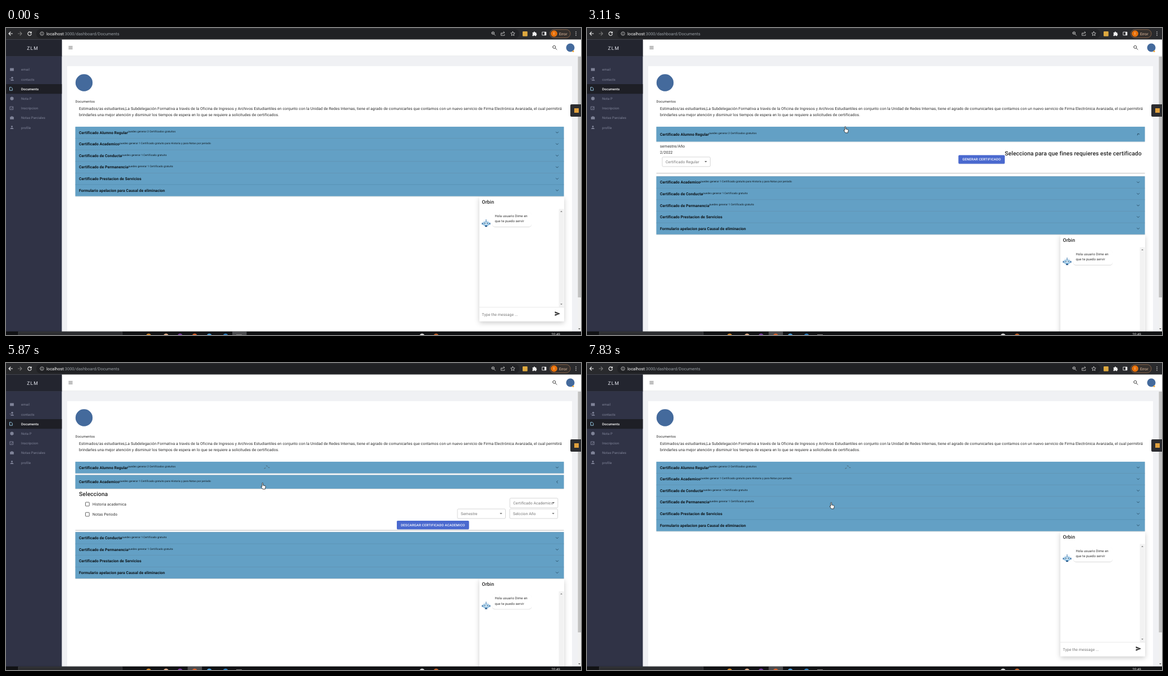
These frames come from a looping animation (1024 by 547 pixels, 8000 ms). An HTML page:

```html
<!DOCTYPE html>
<html lang="es">
<head>
<meta charset="utf-8">
<title>Documentos</title>
<style>
  html, body { margin: 0; width: 100%; height: 100%; overflow: hidden; background: #fff; }
  svg { display: block; }
  text { font-family: Roboto, sans-serif; letter-spacing: .0094em; white-space: pre; text-rendering: geometricPrecision; }
  .line { fill: none; stroke-linecap: round; stroke-linejoin: round; }
</style>
</head>
<body>
<svg id="stage" width="1024" height="547" viewBox="0 0 1024 547"></svg>
<script>
const ROW = 20.62, GROW = 6.86, TOP = 175.9, LEFT = 123.5, WIDTH = 870;

// Markup helpers; text is placed by its vertical centre.
const text = (x, y, size, str, fill = '#2a2a2a', weight = 400, more = '') =>
  `<text x="${x}" y="${y + size * .35}" font-size="${size}" fill="${fill}" font-weight="${weight}" ${more}>${str}</text>`;
const rect = (x, y, w, h, fill, more = '') =>
  `<rect x="${x}" y="${y}" width="${w}" height="${h}" fill="${fill}" ${more}/>`;
const dot = (x, y, r, fill, more = '') => `<circle cx="${x}" cy="${y}" r="${r}" fill="${fill}" ${more}/>`;
const line = (x, y, d, stroke, width = 1) =>
  `<path class="line" transform="translate(${x} ${y})" d="${d}" stroke="${stroke}" stroke-width="${width}"/>`;
const shape = (x, y, d, fill) => `<path transform="translate(${x} ${y})" d="${d}" fill="${fill}"/>`;
const select = (x, y, label) =>
  rect(x, y, 85.5, 17, '#fff', 'rx="1.7" stroke="#bdbdbd" stroke-width=".6"') +
  text(x + 6, y + 8.7, 6.86, label, '#757575') + shape(x + 77.5, y + 8, 'M-2.2-.8h4.4L0 1.5z', '#666');
const button = (x, y, w, label) =>
  rect(x, y + .6, w, 15.6, '#9aa5c8', 'rx="1.7" opacity=".6"') + rect(x, y, w, 15.4, '#4a69cf', 'rx="1.7"') +
  text(x + w / 2, y + 7.8, 6, label, '#fff', 500, 'text-anchor="middle" style="letter-spacing:.0286em"');
const heading = (x, y, str) => text(x, y, 10.29, str, '#222', 500);
const checkbox = (y, label) =>
  rect(141.5, y - 3.4, 6.8, 6.8, 'none', 'rx=".8" stroke="#555" stroke-width=".9"') + text(154, y, 6.86, label, '#333');

const free = (n, rest) => `puedes generar ${n} Certificado${rest}`;
const rows = [
  { title: 'Certificado Alumno Regular', note: free(2, 's gratuitos'), full: 58, body:
    text(130, 8.5, 6.86, 'semestre/Año') + text(130, 19, 6.86, '2/2022') + select(134, 27.5, 'Certificado Regular') +
    button(661.5, 24, 82.5, 'GENERAR CERTIFICADO') +
    heading(744, 21.4, 'Selecciona para que fines requieres este certificado') },
  { title: 'Certificado Academico', note: free(1, ' gratuito para Historia y para Notas por periodo'), full: 82.3, body:
    heading(130, 10, 'Selecciona') + checkbox(27.6, 'Historia academica') + checkbox(45.8, 'Notas Periodo') +
    select(897.3, 17, 'Certificado Academico') + select(804, 36.2, 'Semestre') + select(897, 36.2, 'Selccion Año') +
    button(696, 57, 128.5, 'DESCARGAR CERTIFICADO ACADEMICO') },
  { title: 'Certificado de Conducta', note: free(1, ' gratuito'), full: 80, body:
    text(130, 8.6, 6.86, 'Sanciones:') +
    text(171, 8.6, 6.86, 'Durante su permanencia el(la) estudiante no tuvo sanciones disciplinarias por contravención al Reglamento de Investigaciones Sumarias y Sumarios que instruyen a los Estudiantes de la Universidad Católica de Temuco.') },
  { title: 'Certificado de Permanencia', note: free(1, ' gratuito') },
  { title: 'Certificado Prestacion de Servicios' },
  { title: 'Formulario apelacion para Causal de eliminacion' }
];

const browserBar = () =>
  rect(0, 0, 1024, 20.5, '#292a2d') + rect(54, 2, 860, 16.5, '#202124', 'rx="8"') +
  line(8, 10, 'M3.5 0H-3M0-3L-3 0 0 3', '#eee', 1.1) + line(25, 10, 'M-3.5 0H3M0-3L3 0 0 3', '#777', 1.1) +
  line(42, 10, 'M2.6-1.9A3.2 3.2 0 1 0 3.2 .8M3.2-3.3v2.3H.9', '#eee', 1.1) +
  line(64, 10, 'M-3.2 0a3.2 3.2 0 1 0 6.4 0a3.2 3.2 0 1 0-6.4 0M0-.3v1.8M0-1.7v.1', '#ccc', .8) +
  text(72, 10.2, 7.4, '<tspan fill="#fff">localhost</tspan>:3000/dashboard/Documents', '#9aa0a6') +
  line(868, 10, 'M-3-1a2.3 2.3 0 1 0 4.6 0a2.3 2.3 0 1 0-4.6 0M1 .8L3.5 3.3M-1.7-1h2', '#ccc', .9) +
  line(885, 10, 'M-1.5-1h-2v4.3h6.3V1.5M-1.5 1c0-2 1-3 3.5-3M1-3.5L3-2 1-.3', '#ccc', .8) +
  line(902.5, 10, 'M0-3.6l1.1 2.4 2.6.3-1.9 1.8.5 2.6L0 2.2l-2.3 1.3.5-2.6-1.9-1.8 2.6-.3z', '#ddd', .8) +
  rect(920, 6, 8.7, 8.7, '#dda83f', 'rx="1"') +
  shape(941, 10, 'M-3.5-2h2a1.4 1.4 0 0 1 2.8 0h2v2a1.4 1.4 0 0 1 0 2.7v1.5h-2.2a1.3 1.3 0 0 0-2.5 0h-2.1V1.7a1.2 1.2 0 0 0 0-2.2z', '#eee') +
  line(958.5, 10, 'M-3.3-2.8h6.6v5.6h-6.6z', '#eee', .9) + rect(959, 7, 3, 6, '#eee') +
  rect(968.5, 2.8, 36.5, 14.6, '#35302d', 'rx="7.3" stroke="#a7754f" stroke-width=".7"') + dot(976, 10, 5.8, '#e8710a') +
  text(976, 10.1, 6.5, 'I', '#fff', 400, 'text-anchor="middle"') + text(985, 10.2, 6.6, 'Error', '#f0c8a8') +
  [-3, 0, 3].map(d => dot(1015, 10 + d, .8, '#eee')).join('');

const menuItems = [
  ['email', 'M-3.4-2.5h6.8v5h-6.8z'],
  ['contacts', 'M-1.3-2.5a1.6 1.6 0 0 1 3.6 0a1.6 1.6 0 0 1-3.6 0M-2.4 2.6c.5-3 5.5-3 6 0zM-4-1h2v1h-2z'],
  ['Documents', 'M-2.1-2.8h2.6l1.8 1.8v3.8h-4.4z'],
  ['Nota P', 'M0-3.4l3 1.6v3.6L0 3.4l-3-1.6v-3.6z'],
  ['Inscripcion', 'M-2.7-2.7h5.4v5.4h-5.4zM-1 0l1 1 2.5-3'],
  ['Notas Parciales', 'M-3.4-1.8h2v-1h2.8v1h2v4.6h-6.8z'],
  ['profile', 'M-1.5-1.7a1.5 1.5 0 0 1 3 0a1.5 1.5 0 0 1-3 0M-3 2.8c0-3 6-3 6 0z']
];
const sidebar = () =>
  rect(0, 20.5, 99.4, 521, '#303346') + rect(0, 20.5, 99.4, 30, '#23252f') + rect(0, 50, 99.4, .6, '#3a3d4e') +
  text(47.5, 35.5, 8.6, 'ZLM', '#e4e6ee', 400, 'text-anchor="middle" style="letter-spacing:.13em"') +
  rect(0, 100, 99.4, 17.2, '#1e1f26') +
  menuItems.map(([label, d], i) => {
    const y = 74 + i * 17.2, on = i == 2, outline = on || i == 4, tint = on ? '#fff' : '#7f8398';
    return (outline ? line(on ? 9 : 10, y, d, on ? '#9fd3ee' : tint, .9) : shape(10.5, y, d, tint)) +
      text(27, y + .2, 6, label, tint, on ? 500 : 400);
  }).join('');

const page = () =>
  rect(99, 20, 925, 527, '#f0f1f4') + rect(99, 20, 925, 29.6, '#fff') + rect(99, 49.5, 925, .6, '#e2e4e8') +
  rect(109, 68, 899, 479, '#fff') +
  line(115, 35, 'M-3.2-2.2h6.4M-3.2 0h6.4M-3.2 2.2h6.4', '#555', .8) +
  line(977, 34.5, 'M-3.3-.6a2.5 2.5 0 1 0 5 0a2.5 2.5 0 1 0-5 0M1.2 1.4L4 4.1', '#444', 1) +
  dot(1005, 35, 7.5, '#446a9c') + dot(1010, 41.5, 1.6, '#f2a93b') +
  rect(1018, 50, 6, 491, '#f1f1f1') + rect(1018.5, 51, 5.5, 429, '#c1c1c1') + shape(1021, 536, 'M-1.8-.8h3.6L0 1.2z', '#444') +
  dot(139, 97.5, 15.2, '#446a9c') +
  text(123.5, 131, 6, 'Documentos') +
  text(130, 143.7, 6.86, 'Estimados/as estudiantes,La Subdelegación Formativa a través de la Oficina de Ingresos y Archivos Estudiantiles en conjunto con la Unidad de Redes Internas, tiene el agrado de comunicarles que contamos con un nuevo servicio de Firma Electrónica Avanzada, el cual permitirá') +
  text(130, 154.3, 6.86, 'brindarles una mejor atención y disminuir los tiempos de espera en lo que se requiere a solicitudes de certificados.');

const accordionRow = ({ title, note = '', body = '' }, i) => `
  <g id="row${i}">
    <g filter="url(#soft)">${rect(LEFT, 0, WIDTH, ROW, '#63a0c5', `id="head${i}"`)}</g>
    ${i ? rect(LEFT, -.3, WIDTH, .6, '#5288aa') : ''}
    <g id="label${i}">${text(130, 0, 6.86, `${title}<tspan dy="-2.3" font-size="4.7" font-weight="400">${note}</tspan>`, '#0d1216', 700)}
      <g id="chevron${i}">${line(0, 0, 'M-2-1L0 1 2-1', '#26485e', .9)}</g></g>
    <svg id="body${i}" width="1024" height="0" overflow="hidden">${body}</svg>
    <path id="edge${i}" d="M${LEFT} 0h${WIDTH}" stroke="#aaa" stroke-width=".8"/>
  </g>`;

const robot = () => dot(855, 348, 7, '#f1f5f9') +
  rect(850, 345, 10, 7, '#78b3dc', 'rx="2.5"') + rect(851.3, 346, 7.4, 4.4, '#dbeefa', 'rx="1.6"') +
  dot(853, 348, .9, '#17416b') + dot(857, 348, .9, '#17416b') + line(855, 343, 'M0-1.5V2', '#3b76ab', 1) +
  rect(847.5, 347, 2, 3.2, '#3b76ab') + rect(860.5, 347, 2, 3.2, '#3b76ab') + rect(853, 352, 4, 2.2, '#28598a');
const chat = () =>
  rect(843, 300.5, 151, 222, '#fff', 'rx="1.5" filter="url(#lift)"') +
  text(847.5, 310, 8.8, 'Orbin', '#222', 500) +
  rect(984.5, 322.5, 9, 175, '#f2f2f2') + shape(989, 327, 'M-1.8 .8h3.6L0-1.2z', '#777') + shape(989, 492, 'M-1.8-.8h3.6L0 1.2z', '#777') +
  rect(866, 328, 70, 26, '#fff', 'rx="5" filter="url(#soft)"') +
  text(870.5, 334.6, 6, 'Hola usuario Dime en', '#333') + text(870.5, 344.2, 6, 'que te puedo servir', '#333') + robot() +
  rect(843, 497.3, 151, .6, '#ddd') + text(847.5, 510.3, 6.86, 'Type the message ...', '#777') +
  shape(977.5, 509, 'M0-4L9.5 0 0 4V1L6 0 0-1z', '#333');

const taskbar = () =>
  rect(0, 540.6, 1024, 7, '#111214') + rect(22, 541.3, 185, 6, '#2c2d30', 'stroke="#55575b" stroke-width=".5"') +
  rect(0, 541, 25.5, 6, '#4b4c4f', 'id="active"') +
  [[254, '#d98b2b'], [285, '#e5b08a'], [310, '#7a3fa0'], [336, '#d9622b'], [362, '#4a9fe0'], [391, '#2b7fc0'], [741, '#ddd'], [766, '#c0622b']]
    .map(([x, c]) => dot(x, 549, 4.6, c)).join('') + rect(410, 546, 10, 1, '#888') +
  text(979, 546.2, 6.2, '20:49', '#eee', 400, 'text-anchor="middle"');

const pointer = (id, d) => `<path id="${id}" d="${d}" fill="#fff" stroke="#111" stroke-width=".75" stroke-linejoin="round"/>`;
const stage = document.getElementById('stage');
stage.innerHTML = `<defs>
    <filter id="soft" x="-5%" y="-30%" width="110%" height="160%"><feDropShadow dx="0" dy=".6" stdDeviation=".6" flood-opacity=".25"/></filter>
    <filter id="lift" x="-10%" y="-10%" width="120%" height="120%"><feDropShadow dx="0" dy="3" stdDeviation="4" flood-opacity=".2"/></filter>
  </defs>` + page() + `<g id="chat">${chat()}</g>` + rows.map(accordionRow).join('') +
  `<g id="trace">${line(460, 188, 'M0 0l2-1M3.5-5l2 1M7-2l2 .5', '#4f6b7d', 1.1)}</g>` +
  rect(1005, 136, 22, 22, '#2b2c30', 'rx="2"') + rect(1012, 143, 8, 8, '#e0a03c') +
  browserBar() + sidebar() + taskbar() + `<g id="cursor">
    ${pointer('hand', 'M2 1.5c0-1.4 1.8-1.4 1.8 0v3.4l3.2.7q1.6.4 1.3 2l-.9 4.2H3.3L.5 8q-.6-1.2.6-1.4L2 7.3z')}
    ${pointer('arrow', 'M0 0v8.6l2-1.8 1.3 2.9 1.4-.6-1.3-2.8h2.6z')}</g>`;
const el = {};
stage.querySelectorAll('[id]').forEach(node => el[node.id] = node);

// cubic-bezier(.4, 0, .2, 1)
function ease(x) {
  if (x <= 0 || x >= 1) return x <= 0 ? 0 : 1;
  let lo = 0, hi = 1, s;
  for (let i = 0; i < 20; i++) {
    s = (lo + hi) / 2;
    if (1.2 * (1 - s) ** 2 * s + .6 * (1 - s) * s * s + s ** 3 < x) lo = s; else hi = s;
  }
  return s * s * (3 - 2 * s);
}

// [row, opened at, closed at]
const toggles = [[0, 1345, 1430], [0, 1822, 3080], [1, 4090, 5818], [2, 6703, 7530]];
const openness = (row, t, ms) => toggles.reduce((sum, [r, on, off]) =>
  r == row ? sum + ease((t - on) / ms) - ease((t - off) / ms) : sum, 0);

// [time, x, y]
const path = [[330, 961, 362], [560, 650, 170], [700, 520, 137], [880, 467, 187], [1080, 467, 187], [1150, 461, 182],
  [2940, 461, 182], [2960, 457, 175], [3110, 457, 175], [3200, 460, 181], [3510, 460, 181], [3710, 459, 197.5],
  [4590, 459, 197.5], [4660, 461, 201], [5190, 461, 201], [5260, 457, 195], [5600, 457, 195], [5800, 454, 213],
  [6430, 454, 213], [6700, 444, 230], [6860, 444, 230], [7220, 432, 248]];
function cursorAt(t) {
  const n = path.findIndex(key => key[0] > t);
  if (n < 1) return path[n < 0 ? path.length - 1 : 0].slice(1);
  const [a, b] = [path[n - 1], path[n]], k = (t - a[0]) / (b[0] - a[0]);
  return [a[1] + (b[1] - a[1]) * k, a[2] + (b[2] - a[2]) * k];
}

const move = (node, x, y, more = '') => node.setAttribute('transform', `translate(${x} ${y}) ${more}`);
const show = (node, on) => node.setAttribute('visibility', on ? 'visible' : 'hidden');

function draw(now) {
  const t = now % 8000;
  let y = TOP;
  rows.forEach((row, i) => {
    const p = openness(i, t, 150), inner = (row.full || 0) * openness(i, t, 300), head = ROW + GROW * p;
    if (i) y += GROW * p;
    move(el['row' + i], 0, y);
    el['head' + i].setAttribute('height', head);
    move(el['label' + i], 0, head / 2);
    move(el['chevron' + i], 981.5, 0, `rotate(${180 * p})`);
    el['body' + i].setAttribute('y', head);
    el['body' + i].setAttribute('height', inner);
    move(el['edge' + i], 0, head + inner);
    show(el['edge' + i], inner > .5);
    y += head + inner + GROW * p;
  });
  move(el.chat, 0, y - TOP - ROW * rows.length);

  const [cx, cy] = cursorAt(t), seen = t >= 330;
  const hand = cy >= 175 && cy < 300 && !(t > 4590 && t < 5700);
  move(el.cursor, cx, cy);
  show(el.hand, seen && hand);
  show(el.arrow, seen && !hand);
  show(el.trace, t >= 3600);
  el.active.setAttribute('x', t < 1350 ? 403 : 323.5);
  requestAnimationFrame(draw);
}
draw(performance.now());
</script>
</body>
</html>
```
